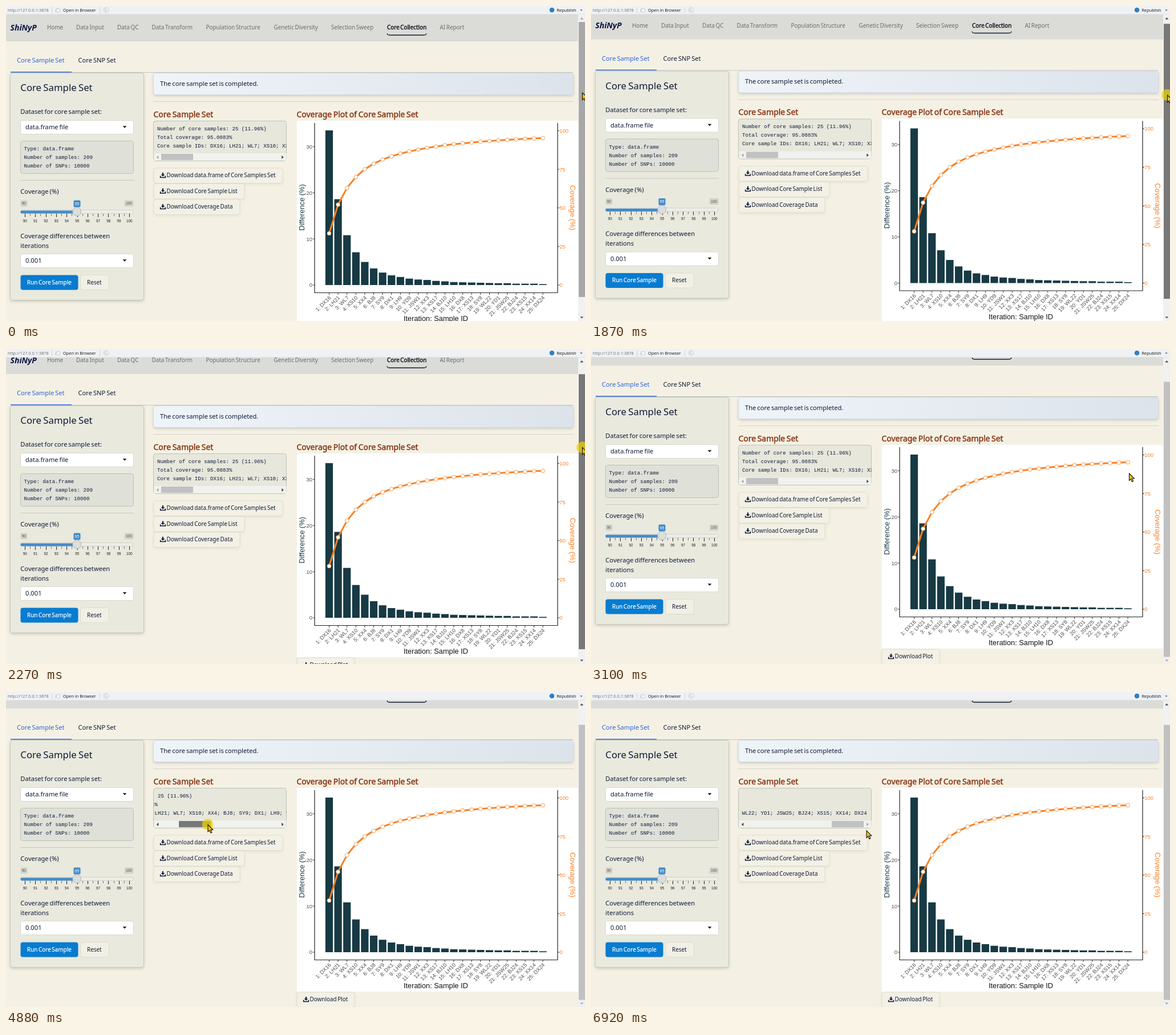
These frames come from a looping animation (1015x552 px, 9.04 s). An HTML page with a canvas:

```html
<!DOCTYPE html>
<html lang="en">
<head>
<meta charset="utf-8">
<title>Core Collection</title>
<style>
html, body { margin: 0; width: 100%; height: 100%; overflow: hidden; background: #f4f1e4; }
canvas { display: block; }
</style>
</head>
<body>
<canvas id="stage" width="1015" height="552"></canvas>
<script>
const ctx = document.getElementById('stage').getContext('2d');
const LOOP = 9040, START = 1580, STEP = 100.8;
const UI = '"Noto Sans", sans-serif';
const ARIAL = '"Liberation Sans", Arial, sans-serif';
const MONO = '"Liberation Mono", monospace';
const BAR = '"Open Sans", sans-serif';
const NAVY = '#101a36', TEAL = '#173a44', ORANGE = '#fb8022', BLUE = '#428bca';

const diffs = [33.5, 18.6, 10.8, 7.1, 5, 3.6, 2.7, 2.1, 1.75, 1.4, 1.2, 1.1, .9,
  .8, .65, .6, .55, .5, .45, .4, .4, .3, .3, .3, .2];
const ids = ('DX16 LH21 WL7 XS10 XX4 BJ8 SY9 DX1 LH9 YD9 JSW1 XX3 XS17 BJ10 LH10 DX8 ' +
  'XS13 SY8 WL22 YD1 JSW25 BJ24 XS15 XX14 DX24').split(' ');

// Keys are [step, value, value...]; steps last about 100 ms
const scrollKeys = [[2, 0], [5, 10.5], [11, 33]];
const cursorKeys = [[2, 1010.5, 152], [5, 1010.5, 165], [11, 1010.5, 188], [13, 1010.5, 188],
  [14, 993, 201], [15, 943.5, 218], [16, 850, 228], [17, 730, 235], [18, 600, 238],
  [19, 480, 237], [20, 395, 234], [21, 345, 231], [22, 324, 230], [23, 322, 229],
  [27, 322, 229], [28, 323, 229], [36, 385, 236], [40, 385, 236], [41, 388, 236], [48, 483, 243]];

function at(keys, k) {
  if (k <= keys[0][0]) return keys[0].slice(1);
  for (let i = 1; i < keys.length; i++) {
    const a = keys[i - 1], b = keys[i];
    if (k <= b[0]) {
      const u = (k - a[0]) / (b[0] - a[0]);
      return a.slice(1).map((v, j) => v + (b[j + 1] - v) * u);
    }
  }
  return keys[keys.length - 1].slice(1);
}

// y is the middle of the capital letters
function text(str, x, y, size, color = NAVY, o = {}) {
  const font = o.font || UI;
  ctx.font = `${o.style || ''} ${size}px ${font}`;
  ctx.wordSpacing = font === UI ? '-1px' : '0px';
  ctx.textAlign = o.align || 'left';
  ctx.fillStyle = color;
  ctx.fillText(str, x, y + size * 0.36);
  if (o.heavy) {
    ctx.strokeStyle = color;
    ctx.lineWidth = o.heavy;
    ctx.strokeText(str, x, y + size * 0.36);
  }
}

function turned(str, x, y, angle, size, color, o) {
  ctx.save();
  ctx.translate(x, y);
  ctx.rotate(angle);
  text(str, 0, 0, size, color, o);
  ctx.restore();
}

function rect(x, y, w, h, color) {
  ctx.fillStyle = color;
  ctx.fillRect(x, y, w, h);
}

function box(x, y, w, h, r, fill, border, shadow) {
  ctx.save();
  ctx.beginPath();
  ctx.roundRect(x + .5, y + .5, w - 1, h - 1, r);
  if (shadow) {
    ctx.shadowColor = shadow;
    ctx.shadowBlur = 5;
    ctx.shadowOffsetY = 2;
  }
  ctx.fillStyle = fill;
  ctx.fill();
  ctx.shadowColor = 'transparent';
  if (border) {
    ctx.strokeStyle = border;
    ctx.lineWidth = 1;
    ctx.stroke();
  }
  ctx.restore();
}

function line(points, color, width = 1) {
  ctx.beginPath();
  points.forEach(p => ctx.lineTo(p[0], p[1]));
  ctx.strokeStyle = color;
  ctx.lineWidth = width;
  ctx.stroke();
}

function poly(points, color) {
  ctx.beginPath();
  points.forEach(p => ctx.lineTo(p[0], p[1]));
  ctx.closePath();
  ctx.fillStyle = color;
  ctx.fill();
}

function disc(x, y, r, fill, stroke) {
  ctx.beginPath();
  ctx.arc(x, y, r, 0, Math.PI * 2);
  ctx.fillStyle = fill;
  ctx.fill();
  if (stroke) {
    ctx.strokeStyle = stroke;
    ctx.lineWidth = 1;
    ctx.stroke();
  }
}

function caret(x, y, w, color) {
  poly([[x - w, y - w / 2], [x + w, y - w / 2], [x, y + w / 2]], color);
}

function toolbar() {
  rect(0, 0, 1015, 15, '#eff1f4');
  rect(0, 14, 1015, 1, '#dfe2e5');
  text('http://127.0.0.1:3878', 3, 7.5, 7.4, '#6d6d6d', { font: BAR });
  rect(80, 2, 1, 11, '#d3d6d9');
  box(87, 4, 8, 7, 1, '#fafafa', '#c2c6ca');
  line([[86, 10], [90, 6]], '#a9b4be');
  text('Open in Browser', 100, 7.5, 7.4, '#111', { font: BAR });
  rect(164, 2, 1, 11, '#d3d6d9');
  disc(175.5, 7, 4.5, '#f4f5f6', '#c9ccd0');
  ctx.beginPath();
  ctx.arc(175.5, 7, 2.2, .3, 5.2);
  ctx.strokeStyle = '#b5b9be';
  ctx.stroke();
  disc(957, 7, 4.3, '#2f80c3');
  text('Republish', 965.5, 7.5, 7.4, '#111', { font: BAR });
  caret(1008.5, 7.5, 2, '#333');
}

function navbar() {
  rect(0, 0, 1003, 62, '#dbdcd7');
  text('ShiNyP', 7.5, 37.5, 14, '#0d1440', { style: 'italic bold' });
  const items = [['Home', 72], ['Data Input', 123], ['Data QC', 195], ['Data Transform', 255.5],
    ['Population Structure', 350.5], ['Genetic Diversity', 469.5], ['Selection Sweep', 570],
    ['AI Report', 760.5]];
  items.forEach(([s, x]) => text(s, x, 37.5, 9.92, '#696d70'));
  text('Core Collection', 668, 37.5, 9.92, '#080d18', { heavy: .35 });
  ctx.beginPath();
  ctx.moveTo(668, 48);
  ctx.quadraticCurveTo(668.5, 51, 672, 51);
  ctx.lineTo(733, 51);
  ctx.quadraticCurveTo(736.5, 51, 737, 48);
  ctx.strokeStyle = '#141c33';
  ctx.lineWidth = 1.3;
  ctx.stroke();
}

function tabs() {
  rect(8, 116, 986, 1, '#c3c7c4');
  rect(8, 115, 107, 1.5, '#3e6fe0');
  text('Core Sample Set', 19, 95, 11.16, '#2f63d8');
  text('Core SNP Set', 126.5, 95, 11.16);
}

function select(y, label) {
  box(25, y, 199, 25, 3, '#fff', '#d8d8cf');
  text(label, 34, y + 12, 11.16);
  caret(208, y + 12, 3.4, '#111');
}

function slider() {
  const small = { font: ARIAL, align: 'center' };
  box(25, 340, 13, 12, 2, '#d3d4ca');
  text('90', 31.3, 346, 6.6, '#555', small);
  box(207, 340, 17, 12, 2, '#d3d4ca');
  text('100', 215.4, 346, 6.6, '#555', small);
  box(118, 340, 13, 13, 2, BLUE);
  text('95', 124.5, 346.2, 7, '#fff', small);
  box(25, 357, 199, 7, 3, '#eeeee8', '#d2d2cb');
  box(25, 358, 100, 6, 2, BLUE);
  for (let i = 0; i <= 20; i++) {
    const major = i % 2 === 0, x = 33 + i * 9.15;
    rect(Math.round(x), 364, 1, major ? 6 : 4, major ? '#222' : '#777');
    if (major) text(90 + i / 2, x + .3, 376.3, 6.3, '#222', small);
  }
  disc(124.2, 360.3, 7.4, '#dcdedc', '#b3b6b4');
}

function sidebar() {
  box(7, 117, 235, 399, 4, '#e9e9de', '#c6c8be', 'rgba(70,70,50,.25)');
  text('Core Sample Set', 25.3, 143, 16.74);
  text('Dataset for core sample set:', 25.3, 185, 11.16);
  select(200, 'data.frame file');
  box(25, 236, 199, 58, 4, '#dfe1d9', '#bcc0ba');
  ['Type: data.frame', 'Number of samples: 209', 'Number of SNPs: 10000']
    .forEach((s, i) => text(s, 31.5, 250 + i * 15, 9.15, NAVY, { font: MONO }));
  rect(25, 305, 199, 1, '#c9cac1');
  text('Coverage (%)', 25.3, 325, 11.16);
  slider();
  text('Coverage differences between', 25.3, 402.5, 11.16);
  text('iterations', 25.3, 419.5, 11.16);
  select(434, '0.001');
  box(25, 471, 102, 27, 4, '#087cd0');
  text('Run Core Sample', 37, 484, 9.92, '#fff', { heavy: .2 });
  box(130, 471, 51, 27, 4, '#f2f0e5', '#dedccf');
  text('Reset', 142, 484, 9.92);
}

function download(x, y, w, label) {
  box(x, y, w, 27.5, 4, '#f3f0e5', '#e1ded1', 'rgba(90,80,50,.1)');
  const cx = x + 16.5, cy = y + 13;
  rect(cx - 1, cy - 4.5, 2, 4, NAVY);
  poly([[cx - 3.4, cy - 1.2], [cx + 3.4, cy - 1.2], [cx, cy + 2.3]], NAVY);
  line([[cx - 4.3, cy + 1.2], [cx - 4.3, cy + 4], [cx + 4.3, cy + 4], [cx + 4.3, cy + 1.2]], NAVY, 1.7);
  text(label, x + 23, y + 13, 9.92);
}

function results(slide, thumb) {
  box(258, 201, 234, 71, 4, '#e7e7dc', '#bdc1bb');
  ctx.save();
  ctx.beginPath();
  ctx.rect(259.5, 202, 232, 69);
  ctx.clip();
  const lines = ['Number of core samples: 25 (11.96%)', 'Total coverage: 95.0883%',
    'Core sample IDs: ' + ids.join('; ')];
  lines.forEach((s, i) =>
    text(s, 265 - slide * 4.2, 214.5 + i * 15, 9.15, NAVY, { font: MONO }));
  rect(259, 258, 233, 13, '#f1f1ee');
  rect(272 + slide, 259, 56, 11, thumb);
  const left = slide > 0 ? '#444' : '#a3a3a3', right = slide < 150 ? '#444' : '#a3a3a3';
  poly([[267.3, 262], [267.3, 268], [263.8, 265]], left);
  poly([[483.3, 262], [483.3, 268], [486.8, 265]], right);
  ctx.restore();
}

function plot() {
  const base = 489, px = i => 566.5 + i * 15.61;
  const tick = { font: ARIAL, align: 'right' }, mid = { font: ARIAL, align: 'center' };
  rect(510, 201, 493, 357, '#fff');
  diffs.forEach((d, i) => rect(px(i) - 6.6, base - d * 8.09, 13.2, d * 8.09, TEAL));

  let sum = 0;
  const curve = diffs.map((d, i) => [px(i), base - (sum += d) * 2.705]);
  ctx.lineJoin = 'round';
  line(curve, ORANGE, 3);
  curve.forEach(p => disc(p[0], p[1], 3.4, '#fff', '#f3a05c'));

  line([[541, 205], [541, 502.5], [967, 502.5], [967, 205]], '#222', 1.2);
  for (let i = 0; i < 4; i++) {
    const y = base - i * 80.9;
    rect(538, y - .5, 3, 1, '#333');
    text(i * 10, 537, y, 9.5, '#4d4d4d', tick);
  }
  for (let i = 0; i < 5; i++) {
    const y = base - i * 67.62;
    rect(967, y - .5, 3, 1, '#333');
    text(i * 25, 970.3, y, 9.5, ORANGE, { font: ARIAL });
  }
  ids.forEach((id, i) => {
    rect(px(i) - .5, 503, 1, 3, '#333');
    turned(`${i + 1}: ${id}`, px(i) + 1.5, 509.5, -Math.PI / 4, 9.4, '#4d4d4d', tick);
  });
  turned('Difference (%)', 518, 353, -Math.PI / 2, 12.8, TEAL, mid);
  turned('Coverage (%)', 994, 353.5, Math.PI / 2, 12.8, ORANGE, mid);
  text('Iteration: Sample ID', 753.5, 547.7, 12.8, '#111', mid);
}

function page(slide, thumb) {
  rect(0, 0, 1003, 600, '#f4f1e4');
  navbar();
  tabs();
  sidebar();
  const fade = ctx.createLinearGradient(259, 117, 994, 156);
  fade.addColorStop(0, '#eff4f9');
  fade.addColorStop(1, '#dde3eb');
  box(258, 117, 737, 39, 4, fade, '#d3d9de', 'rgba(80,90,110,.28)');
  text('The core sample set is completed.', 270, 135.5, 11.16);
  rect(258, 167, 737, 1, '#d5d3c8');
  const red = '#85300f';
  text('Core Sample Set', 258.5, 189.5, 13.95, red, { heavy: .4 });
  text('Coverage Plot of Core Sample Set', 509.5, 189.5, 13.95, red, { heavy: .4 });
  results(slide, thumb);
  download(258.5, 283.5, 227, 'Download data.frame of Core Samples Set');
  download(258.5, 311, 160, 'Download Core Sample List');
  download(258.5, 338.5, 152, 'Download Coverage Data');
  plot();
  download(509.5, 558.5, 102, 'Download Plot');
}

function scrollbar(scroll, color) {
  rect(1003, 15, 12, 537, '#f1f1f1');
  rect(1004, 28 + scroll * .895, 11, 482, color);
  poly([[1006.3, 23.5], [1012.3, 23.5], [1009.3, 20]], scroll > 0 ? '#505050' : '#a3a3a3');
  caret(1009.3, 546, 3, scroll < 33 ? '#505050' : '#a3a3a3');
}

function pointer(x, y, pressed) {
  if (pressed) disc(x - .5, y - .5, 10, 'rgba(236,212,0,.7)');
  ctx.save();
  ctx.translate(x, y);
  ctx.beginPath();
  [[0, 0], [0, 12.4], [2.8, 9.9], [4.8, 14.6], [7, 13.6], [5, 9.1], [8.8, 8.8]]
    .forEach(p => ctx.lineTo(p[0], p[1]));
  ctx.closePath();
  ctx.fillStyle = '#ffbf10';
  ctx.fill();
  ctx.strokeStyle = '#111';
  ctx.lineWidth = 1.1;
  ctx.stroke();
  ctx.restore();
}

function draw(t) {
  const k = Math.floor((t - START + 20) / STEP);
  const [scroll] = at(scrollKeys, k);
  const [x, y] = at(cursorKeys, k);
  const idle = '#c1c1c1', hover = '#a8a8a8', held = '#787878';
  const side = k < 1 ? hover : k < 12 ? held : k < 14 ? hover : idle;
  const thumb = k < 22 ? idle : k < 26 ? hover : k < 53 ? held : idle;
  const slide = k < 28 ? 0 : Math.min(150, (x - 322) * .97);
  ctx.save();
  ctx.beginPath();
  ctx.rect(0, 15, 1003, 537);
  ctx.clip();
  ctx.translate(0, -scroll);
  page(slide, thumb);
  ctx.restore();
  toolbar();
  scrollbar(scroll, side);
  pointer(x, y, (k >= 0 && k < 12) || (k >= 25 && k < 53));
}

function frame() {
  draw(performance.now() % LOOP);
  requestAnimationFrame(frame);
}
frame();
</script>
</body>
</html>
```
